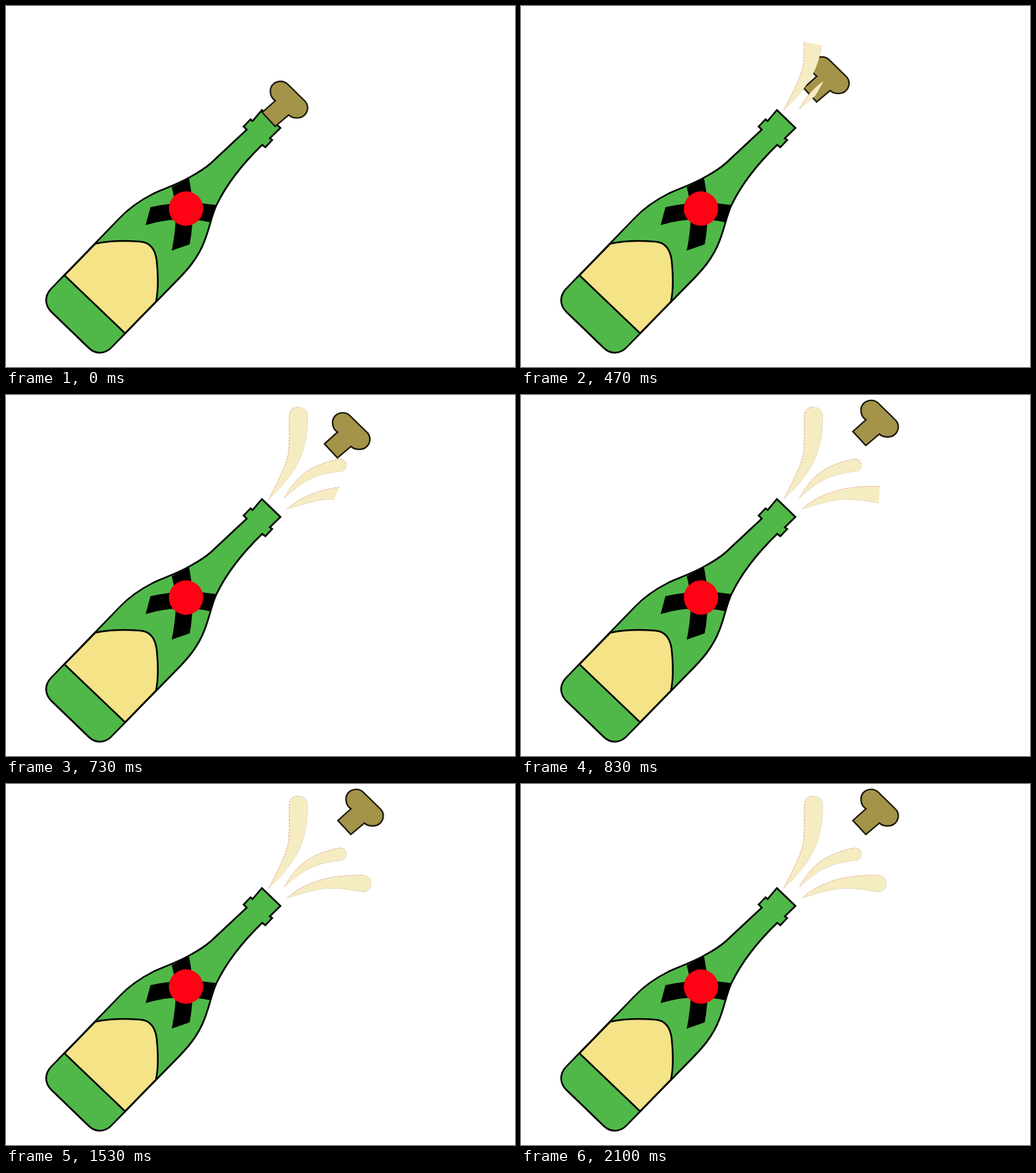
These frames come from a looping animation (740 by 524 pixels, 2.13 s). An HTML page with a canvas:

```html
<!DOCTYPE html>
<html lang="en">
<head>
<meta charset="utf-8">
<title>Popping cork</title>
<style>
html, body { margin: 0; width: 100%; height: 100%; overflow: hidden; background: #fff; }
canvas { display: block; }
</style>
</head>
<body>
<canvas id="stage" width="740" height="524"></canvas>
<script>
const ctx = document.getElementById('stage').getContext('2d');
const LOOP = 2130;
const STEP = 100 / 3;

const bottle = new Path2D(`M372 151 L399 177 L383.500 192 L387 194.500 L377 205 L372.500 201.500
  C346 227 322 256 306 289 C299 304 296 322 289 340 C279 367 262 385 246 401
  L153 496 C144 505 131 506 121 497 L66 444 C56 434 56 421 65 411
  L165 308 C181 291 197 281 215 272 C233 264 251 258 268 248 C279 242 289 236 298 228
  L350 179.500 L345.500 175 L355.500 164.500 L358.500 167 Z`);
const label = new Path2D(`M85 391 L130 345 C148 341 175 340.500 195 342 C211 343 217 354 219 369
  C221 388 221.500 413 218 429 L173 475 Z`);
const cross = new Path2D(`M241 263 L266 250 Q270 268 271 290 Q272 322 267 346 L241 355
  Q246 330 247 305 Q246 282 241 263 Z
  M210 292 Q258 281 306 289 L297 314 Q250 304 203 318 Z`);
const cork = new Path2D(`M372.500 154.500 L391.300 174.800 L411 158.200 C415 162 419 162.500 423 162.500
  C432 162.500 438.500 156 438.500 147.500 C438.500 143 436.500 139.500 433 136.500
  L409.500 113.500 C406.500 110.500 403 109.300 399.500 109.300 C391 109.300 384.300 115 384.300 123.500
  C384.300 130 387 134.500 391.500 137.500 Z`);

// Cut keys: time, point on the cut line, direction of growth in degrees
const sprays = [
  {
    top: 'M382 151 C397 122 409 98 410.500 84 C413 62 411 42 412 29 C413 21 418 17.500 425 17.500',
    rest: 'C433 17.500 438 22 438.500 29 C439 48 437 62 433 77 C426 103 407 129 382 151',
    cut: [[333, 382, 153, -55], [467, 423, 54, -79], [525, 426, 14, -80]]
  },
  {
    top: 'M405 149 C413 134 424 120 437 111 C452 101 469 96 484 93 C490 92 494 96 494.500 101',
    rest: 'C495 107 492 110.500 487 111 C469 112.500 451 117 437 125 C425 131.500 415 141 405 149',
    cut: [[340, 404, 150, 30], [467, 435, 118, 30], [633, 472, 105, -15], [735, 498, 100, -5]]
  },
  {
    top: 'M409 165.500 C424 151 445 142.500 462 138 C481 133 503 132 520 132.500',
    rest: 'C527 133 531 138 531 144.500 C531 152 526 157 519 156.700 C502 154 486 151 469 151.500 C446 153 429 160 409 165.500',
    cut: [[545, 408, 166, 20], [633, 437, 151, 42], [833, 521, 144, 5], [870, 534, 144, 0]]
  }
].map(s => ({ cut: s.cut, body: new Path2D(s.top + s.rest), edge: new Path2D(s.top) }));

const corkKeys = [[0, 0], [300, 6.3], [467, 38.5], [833, 110]];

// Linear interpolation between rows of [time, ...values]
function at(keys, t) {
  const last = keys[keys.length - 1];
  if (t >= last[0]) return last.slice(1);
  const i = Math.max(1, keys.findIndex(k => k[0] > t));
  const a = keys[i - 1], b = keys[i];
  const p = Math.max(0, (t - a[0]) / (b[0] - a[0]));
  return a.slice(1).map((v, j) => v + (b[j + 1] - v) * p);
}

function shape(path, fill, line, width) {
  ctx.fillStyle = fill;
  ctx.fill(path);
  ctx.strokeStyle = line;
  ctx.lineWidth = width;
  ctx.stroke(path);
}

function drawBottle() {
  shape(bottle, '#50b848', '#000', 2.5);
  shape(label, '#f4e387', '#000', 2.5);
  ctx.fillStyle = '#000';
  ctx.fill(cross);
  ctx.fillStyle = '#ff0214';
  ctx.beginPath();
  ctx.arc(261.7, 294, 25, 0, Math.PI * 2);
  ctx.fill();
}

function drawCork(t) {
  const [d] = at(corkKeys, t);
  ctx.save();
  ctx.translate(d, -d * 0.923);
  shape(cork, '#a49449', '#1c180c', 2.2);
  ctx.restore();
}

function drawSpray({ cut, body, edge }, t) {
  if (t <= cut[0][0]) return;
  const [x, y, deg] = at(cut, t);
  ctx.save();
  if (t < cut[cut.length - 1][0]) {
    const clip = new Path2D(), half = new Path2D();
    half.rect(-400, -400, 400, 800);
    clip.addPath(half, new DOMMatrix().translate(x, y).rotate(deg));
    ctx.clip(clip);
  }
  ctx.setLineDash([1, 1.5]);
  shape(body, '#f6ecc2', 'rgba(130,120,85,.55)', 0.8);
  ctx.setLineDash([1.5, 3]);
  ctx.strokeStyle = 'rgba(255,40,30,.6)';
  ctx.stroke(edge);
  ctx.restore();
}

function draw(ms) {
  const tick = Math.floor((ms % LOOP) / 10) * 10;
  const t = Math.floor((tick + 5) / STEP) * STEP;
  ctx.fillStyle = '#fff';
  ctx.fillRect(0, 0, 740, 524);
  drawBottle();
  drawCork(t);
  sprays.forEach(s => drawSpray(s, t));
}

const start = performance.now();
function loop() {
  draw(performance.now() - start);
  requestAnimationFrame(loop);
}
loop();
</script>
</body>
</html>
```
